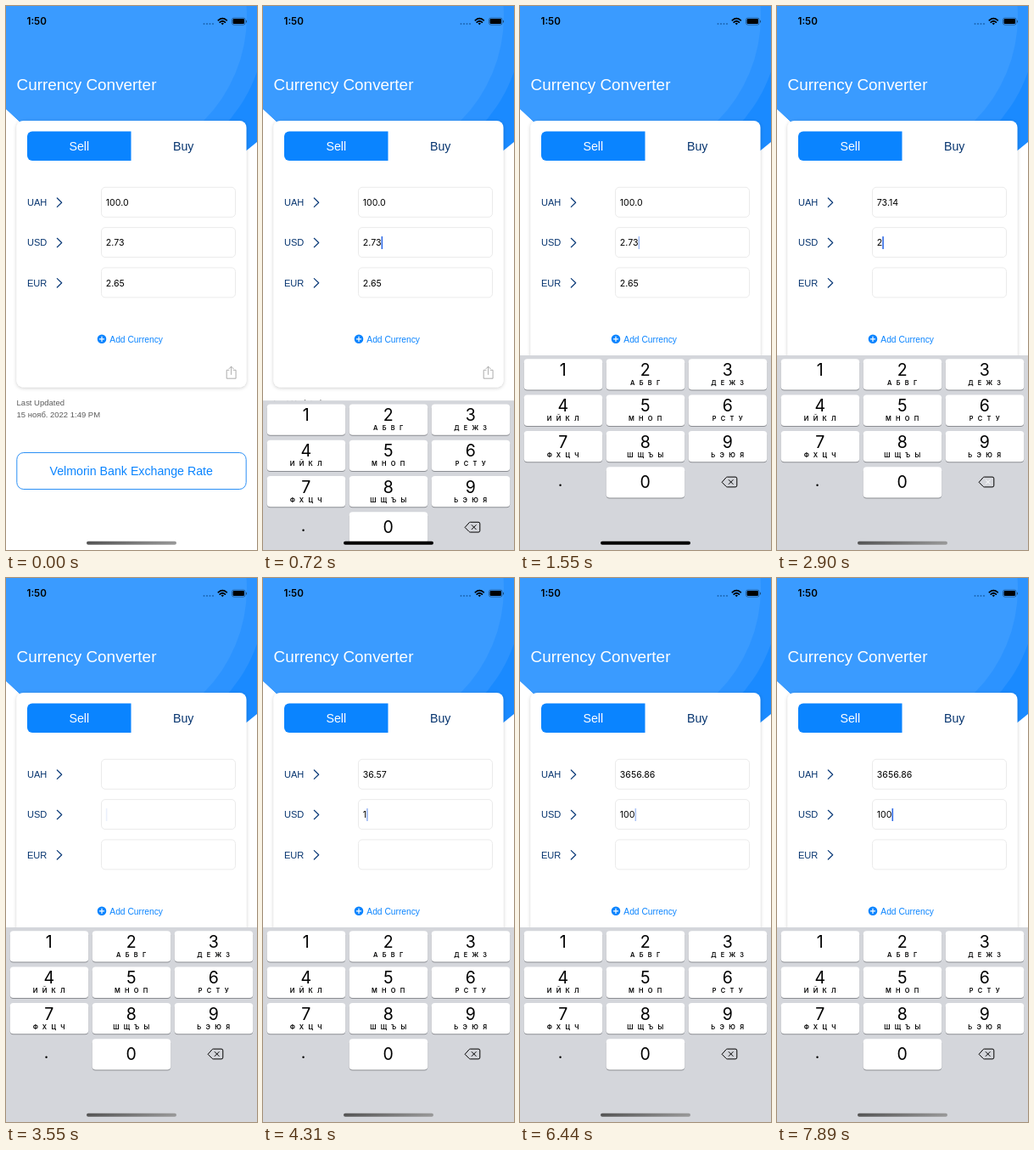
Animation of 296 by 640 pixels, one loop 8 s. Source, as an HTML page:

```html
<!DOCTYPE html>
<html lang="en">
<head>
<meta charset="utf-8">
<title>Currency Converter</title>
<style>
  html, body { margin: 0; width: 100%; height: 100%; overflow: hidden; background: #fff; }
  svg { display: block; width: 296px; height: 640px; }
  text { font-family: "Liberation Sans", Arial, sans-serif; white-space: pre; }
  .ui { font-family: Inter, Roboto, sans-serif; }
  .mid { text-anchor: middle; }
  .blue { fill: #0a84ff; }
  .navy { fill: #06346f; }
  .line { fill: none; stroke-linecap: round; stroke-linejoin: round; }
  .digit { font-size: 19.5px; }
  .letters { font-size: 7.4px; font-weight: 600; letter-spacing: 5.3px; }
</style>
</head>
<body>
<svg viewBox="0 0 296 640">
  <defs>
    <clipPath id="header"><path d="M0 0H296V160L160 270L0 121Z"/></clipPath>
    <filter id="shadow" x="-10%" y="-10%" width="120%" height="120%">
      <feDropShadow dx="0" dy="1" stdDeviation="2.2" flood-opacity=".2"/>
    </filter>
    <linearGradient id="grey"><stop stop-color="#555"/><stop offset="1" stop-color="#999"/></linearGradient>
  </defs>

  <g clip-path="url(#header)">
    <rect width="296" height="280" fill="#1a8aff"/>
    <circle cx="126" cy="18" r="180" fill="#2c93ff"/>
    <circle cx="110" cy="12" r="174" fill="#3a9bff"/>
  </g>
  <text class="ui" x="24.5" y="22.3" font-size="11.6" font-weight="600">1:50</text>
  <g fill="#0b4a8c" opacity=".65">
    <circle cx="233.5" cy="21" r="1"/><circle cx="237" cy="21" r="1"/>
    <circle cx="240.5" cy="21" r="1"/><circle cx="244" cy="21" r="1"/>
  </g>
  <g class="line" stroke="#000" stroke-width="1.7" stroke-linecap="butt">
    <path d="M250.3 16.8Q255.3 12.4 260.3 16.8M252.2 19.1Q255.3 16.4 258.4 19.1"/>
  </g>
  <path d="M253.6 20.5Q255.3 19.2 257 20.5L255.3 22.2Z"/>
  <rect x="266.5" y="14" width="15.6" height="8.2" rx="2.3" fill="none" stroke="#000" stroke-opacity=".45" stroke-width=".8"/>
  <rect x="267.6" y="15.1" width="13.4" height="6" rx="1.3"/>
  <rect x="283" y="16.7" width="1" height="2.8" rx=".5" opacity=".5"/>
  <text x="12.6" y="99" font-size="18.9" fill="#fff">Currency Converter</text>

  <rect x="12.5" y="135" width="271" height="313.5" rx="8" fill="#fff" filter="url(#shadow)"/>
  <path class="blue" d="M147.5 147.5H31a6 6 0 0 0-6 6V176a6 6 0 0 0 6 6H147.5Z"/>
  <text class="mid" x="86.3" y="170" font-size="14.2" fill="#fff">Sell</text>
  <text class="mid navy" x="209.2" y="170" font-size="14.2">Buy</text>
  <g id="rows"></g>
  <rect id="cursor" y="271" width="1.6" height="15" rx=".6" fill="#2f6ae6"/>
  <circle class="blue" cx="113" cy="391.8" r="5.3"/>
  <path class="line" d="M110.4 391.8h5.2M113 389.2v5.2" stroke="#fff" stroke-width="1.2"/>
  <text class="blue" x="122.3" y="395.5" font-size="10.26">Add Currency</text>
  <path class="line" d="M263 428.3h-2.8v9.9h10.9v-9.9h-2.8M265.6 433.5v-9.2M263 426.7l2.6-2.6l2.6 2.6" stroke="#a4a4a4" stroke-width=".9"/>

  <g font-size="9.47" fill="#5a5a5a">
    <text x="12.6" y="469.6">Last Updated</text>
    <text x="12.6" y="483.8">15 нояб. 2022 1:49 PM</text>
  </g>
  <rect x="12.8" y="525.5" width="270.4" height="43" rx="8" fill="#fff" stroke="#2a8ff5"/>
  <text class="mid blue" x="147.7" y="552" font-size="14.2">Velmorin Bank Exchange Rate</text>

  <g id="keyboard">
    <rect y="411" width="296" height="240" fill="#d4d6db"/>
    <g id="keys"></g>
    <g id="del" class="line" stroke="#000" stroke-width="1">
      <path d="M238.4 560L243.2 554.6Q243.7 554.1 244.4 554.1H254a1.8 1.8 0 0 1 1.8 1.8V564.1a1.8 1.8 0 0 1-1.8 1.8H244.4Q243.7 565.9 243.2 565.4Z"/>
      <path id="cross" d="M246.2 557.5l5 5M251.2 557.5l-5 5"/>
    </g>
  </g>
  <rect id="home" x="95" y="629.7" width="106" height="4" rx="2"/>
</svg>
<script>
const LOOP = 8000, KEYBOARD_HEIGHT = 229, RATE = 36.5686;
const $ = id => document.getElementById(id);

$('rows').innerHTML = ['UAH', 'USD', 'EUR'].map((code, i) => {
  const y = 231 + i * 47.3;
  return `<text class="navy" x="25" y="${y + 4}" font-size="11.05">${code}</text>
    <path class="line" d="M60.3 ${y - 5}l5.4 5.2l-5.4 5.2" stroke="#0a3a78" stroke-width="1.2"/>
    <rect x="112.5" y="${y - 17.7}" width="158" height="35" rx="4.5" fill="#fff" stroke="#ebebeb"/>
    <text class="ui" id="${code}" x="117.8" y="${y + 4}" font-size="10.6"></text>`;
}).join('');

const letters = ['', 'АБВГ', 'ДЕЖЗ', 'ИЙКЛ', 'МНОП', 'РСТУ', 'ФХЦЧ', 'ШЩЪЫ', 'ЬЭЮЯ'];
const key = (digit, col, row, sub) => {
  const x = 4.7 + col * 97, y = 415.3 + row * 42.3;
  const base = y + (digit ? 19.7 : 24.3);
  return `<rect x="${x}" y="${y + 1}" width="92.5" height="36.3" rx="4" fill="#8b8d92"/>
    <rect id="key${digit}" x="${x}" y="${y}" width="92.5" height="36.3" rx="4"/>
    <text class="ui mid digit" x="${x + 46}" y="${base}">${digit}</text>
    <text class="ui mid letters" x="${x + 48.6}" y="${y + 30.6}">${sub}</text>`;
};
$('keys').innerHTML =
  letters.map((sub, i) => key(i + 1, i % 3, Math.floor(i / 3), sub)).join('') +
  key(0, 1, 3, '') +
  '<text class="ui mid digit" x="47.5" y="565">.</text>';

// Each track lists [start time, value]; a value holds until the next one.
const typed = [[0, '2.73'], [1990, '2.7'], [2250, '2.'], [2510, '2'], [3010, ''],
  [3910, '1'], [4630, '10'], [5050, '100']];
const pressed = [[0, ''], [1890, 'del'], [1990, ''], [2140, 'del'], [2250, ''], [2370, 'del'],
  [2510, ''], [2900, 'del'], [3010, ''], [3670, 'key1'], [3910, ''], [4510, 'key0'], [5050, '']];
const blink = [[0, 0], [500, 1], [1430, .75], [1550, .45], [1890, 1], [3440, .5], [3550, .1],
  [3670, .6], [3910, 1], [4310, .5], [4510, 1], [5440, .4], [5680, .7], [5800, 1],
  [6230, .7], [6340, .4], [6450, .15], [6550, 0], [6770, 1], [7350, .6], [7450, .3],
  [7560, 0], [7780, .6], [7890, 1]];
const at = (track, t) => track.findLast(([start]) => start <= t)[1];

// Critically damped slide, advancing in 110 ms steps.
function keyboardOffset(t) {
  if (t < 500) return KEYBOARD_HEIGHT;
  if (t >= 1190) return 0;
  const x = Math.floor((t - 500) / 110) * 110 * .0127;
  return KEYBOARD_HEIGHT * (1 + x) * Math.exp(-x);
}

function draw(t) {
  const usd = at(typed, t), down = at(pressed, t);
  $('USD').textContent = usd;
  $('UAH').textContent = usd === '2.73' ? '100.0' : usd && (usd * RATE).toFixed(2);
  $('EUR').textContent = t < 1990 ? '2.65' : '';

  const width = usd ? $('USD').getComputedTextLength() : 0;
  $('cursor').setAttribute('x', 117.8 + width);
  $('cursor').setAttribute('opacity', at(blink, t));

  $('keyboard').setAttribute('transform', `translate(0 ${keyboardOffset(t)})`);
  for (const id of ['key0', 'key1']) $(id).setAttribute('fill', down === id ? '#b4b8c1' : '#fff');
  $('del').setAttribute('fill', down === 'del' ? '#000' : 'none');
  $('cross').setAttribute('stroke', down === 'del' ? '#fff' : '#000');
  $('home').setAttribute('fill', t >= 500 && t < 1890 ? '#000' : 'url(#grey)');
}

for (let n = 2; n <= 9; n++) $('key' + n).setAttribute('fill', '#fff');
draw(0);
let origin;
requestAnimationFrame(function tick(now) {
  origin ??= now;
  draw((now - origin) % LOOP);
  requestAnimationFrame(tick);
});
</script>
</body>
</html>
```
